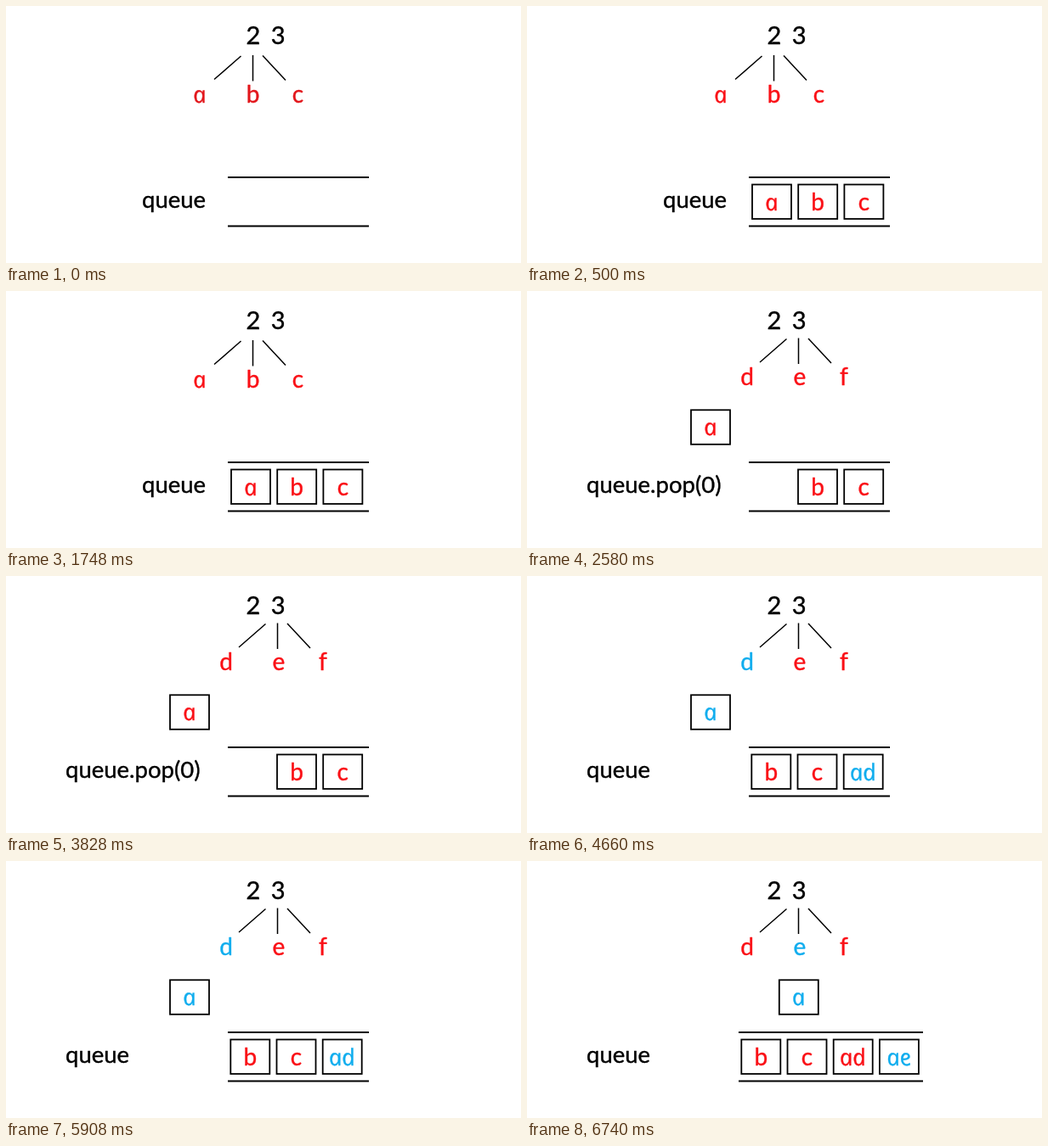
An HTML page for the animation above (8 s loop, 606 by 303 pixels).

```html
<!DOCTYPE html>
<html lang="en">
<head>
<meta charset="utf-8">
<title>Letter queue</title>
<style>
  html, body { margin: 0; width: 100%; height: 100%; overflow: hidden; background: #fff; }
  svg { display: block; width: 100vw; height: 100vh; }
  text { font: 28px Lato, "Open Sans", sans-serif; stroke-width: .4; stroke-linejoin: round; }
  .round { font: italic 27px "Open Sans", "Noto Sans", sans-serif; }
  .mid { text-anchor: middle; }
  .word { font-size: 27.5px; }
  .digits { font-size: 29px; word-spacing: 5px; }
  path, rect { fill: none; stroke: #000; }
</style>
</head>
<body>
<svg id="stage" viewBox="0 0 606 303"></svg>
<script>
const stage = document.getElementById('stage');
const BLACK = '#000', DARK = '#e2161b', RED = '#fa1016', BLUE = '#10adee';
const LOOP = 8000;

function text(s, x, y, color, cls = 'mid') {
  // Upright italics give the single-storey "a".
  const round = s.includes('a');
  const place = round ? `translate(${x + 1.3} ${y}) skewX(12)` : `translate(${x} ${y})`;
  return `<text class="${cls}${round ? ' round' : ''}" transform="${place}" fill="${color}" stroke="${color}">${s}</text>`;
}

const line = (d, w) => `<path d="${d}" stroke-width="${w}"/>`;

const box = (s, cx, y, color) =>
  `<rect x="${cx - 23}" y="${y}" width="46" height="40.5" stroke-width="1.8"/>` +
  text(s, cx, y + 30, color);

// Three branches below a digit, each ending in a letter.
function tree(letters, xs, top, colors) {
  const mid = xs[3];
  return line(`M${mid - 14} ${top + 1}L${mid - 45.5} ${top + 28.5}M${mid} ${top}v30.5` +
              `M${mid + 11.5} ${top + .5}l27 29`, 1.5) +
    [...letters].map((s, i) => text(s, xs[i], top + 55.5, colors[i])).join('');
}

const abc = color => tree('abc', [228, 290.5, 343.5, 290.5], 58, [color, color, color]);
const def = (...colors) => tree('def', [259, 321, 373, 319.5], 55.5, colors);

const rails = (x1, x2) => line(`M${x1} 202H${x2}M${x1} 259.5H${x2}`, 1.8);
const label = (s, x) => text(s, x, 237.5, BLACK, 'word');
const queue = (x, items) =>
  items.map(([s, color], i) => box(s, x + 54.2 * i, 210.5, color)).join('');
const head = (x, color) => box('a', x, 140.3, color);

const scenes = [
  [0, abc(DARK) + label('queue', 160) + rails(261, 427)],
  [500, abc(RED) + label('queue', 160) + rails(261, 427) +
    queue(288, [['a', RED], ['b', RED], ['c', RED]])],
  [2580, def(RED, RED, RED) + head(216, RED) + label('queue.pop(0)', 70) +
    rails(261, 427) + queue(342, [['b', RED], ['c', RED]])],
  [4660, def(BLUE, RED, RED) + head(216, BLUE) + label('queue', 70) +
    rails(261, 427) + queue(287.3, [['b', RED], ['c', RED], ['ad', BLUE]])],
  [6740, def(RED, BLUE, RED) + head(319.8, BLUE) + label('queue', 70) +
    rails(249, 466) + queue(275.3, [['b', RED], ['c', RED], ['ad', RED], ['ae', BLUE]])]
];

const digits = text('2 3', 305.5, 45, BLACK, 'mid digits');
let shown;

function draw(now) {
  const t = now % LOOP;
  const scene = scenes.findLast(([start]) => start <= t);
  if (scene !== shown) {
    shown = scene;
    stage.innerHTML = digits + scene[1];
  }
  requestAnimationFrame(draw);
}
draw(performance.now());
</script>
</body>
</html>
```
